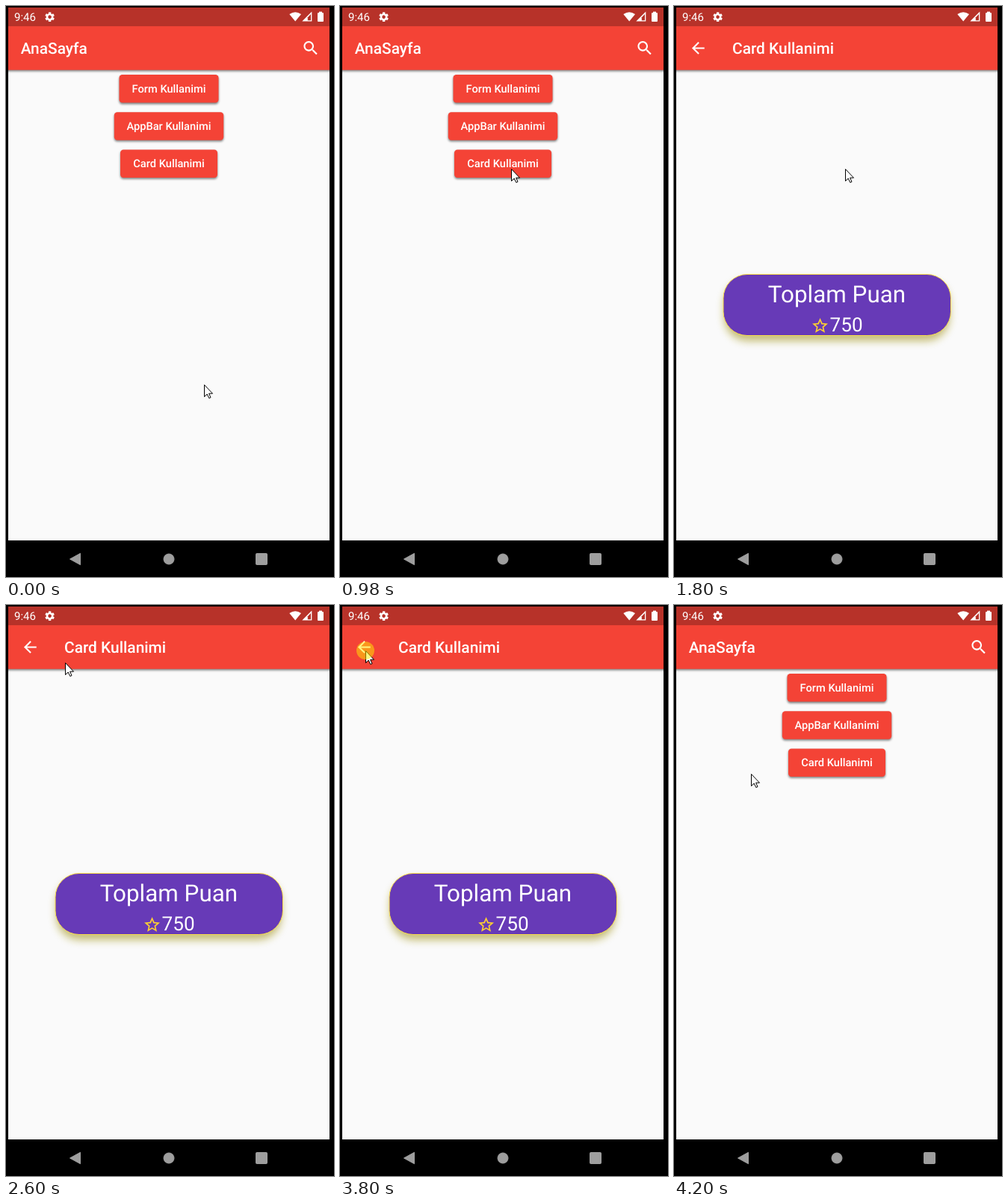
Recreate the animation shown at these times as an HTML page. Size 439 by 765 pixels, loop 4400 ms.

```html
<!DOCTYPE html>
<html lang="tr">
<head>
<meta charset="utf-8">
<title>Card Kullanimi</title>
<style>
  html, body { margin: 0; width: 100%; height: 100%; overflow: hidden; background: #000; }
  svg { display: block; width: 439px; height: 765px; }
  text { font-family: Roboto, sans-serif; fill: #fff; text-rendering: geometricPrecision; }
  .title { font-size: 20.9px; font-weight: 500; }
  .label { font-size: 14.65px; font-weight: 500; text-anchor: middle; }
</style>
</head>
<body>
<svg viewBox="0 0 439 765">
  <defs>
    <clipPath id="screen"><rect x="3" y="2" width="430" height="714"/></clipPath>
    <filter id="soft" x="-10%" y="-30%" width="120%" height="170%"><feGaussianBlur stdDeviation="1.6"/></filter>
    <filter id="wide" x="-20%" y="-50%" width="140%" height="200%"><feGaussianBlur stdDeviation="5.5"/></filter>
    <g id="page">
      <rect x="3" y="2" width="430" height="714" fill="#fafafa"/>
      <rect x="-5" y="60" width="446" height="27.4" fill="#000" opacity=".5" filter="url(#soft)"/>
      <rect x="3" y="2" width="430" height="83.7" fill="#f44336"/>
    </g>
  </defs>
  <rect width="439" height="765"/>

  <g clip-path="url(#screen)">
    <g id="home">
      <use href="#page"/>
      <text class="title" x="19.7" y="64">AnaSayfa</text>
      <path transform="translate(395.3 43.9) scale(1.046)" fill="#fff" d="M15.5 14h-.79l-.28-.27C15.41 12.59 16 11.11 16 9.5 16 5.91 13.09 3 9.5 3S3 5.91 3 9.5 5.91 16 9.5 16c1.61 0 3.09-.59 4.23-1.57l.27.28v.79l5 4.99L20.49 19l-4.99-5zm-6 0C7.01 14 5 11.99 5 9.5S7.01 5 9.5 5 14 7.01 14 9.5 11.99 14 9.5 14z"/>
      <g id="buttons"></g>
    </g>
    <rect id="dim" x="3" y="2" width="430" height="714" opacity=".6"/>
    <g id="card">
      <use href="#page"/>
      <path transform="translate(19.8 43.9) scale(1.046)" fill="#fff" d="M20 11H7.83l5.59-5.59L12 4l-8 8 8 8 1.41-1.41L7.83 13H20z"/>
      <text class="title" x="78" y="64">Card Kullanimi</text>
      <rect x="67" y="367" width="302" height="82" rx="32" fill="#a2941c" opacity=".6" filter="url(#wide)"/>
      <rect x="66" y="359.5" width="304.5" height="82" rx="32" fill="#673ab7" stroke="#fbe04a"/>
      <text x="218" y="397" font-size="31.4" text-anchor="middle">Toplam Puan</text>
      <path transform="translate(183 415.8) scale(1.046)" fill="#fdcf32" d="M22 9.24l-7.19-.62L12 2 9.19 8.63 2 9.24l5.46 4.73L5.82 21 12 17.27 18.18 21l-1.63-7.03zM12 15.4l-3.76 2.27 1-4.28-3.32-2.88 4.38-.38L12 6.1l1.71 4.04 4.38.38-3.32 2.88 1 4.28z"/>
      <text x="208.5" y="436.3" font-size="26.15">750</text>
    </g>
    <rect x="3" y="2" width="430" height="25.1" opacity=".25"/>
  </g>

  <!-- status bar -->
  <text x="11" y="20" font-size="15">9:46</text>
  <g transform="translate(58.6 14.7) rotate(30)" fill="none" stroke="#fff">
    <circle r="3.6" stroke-width="2.6"/>
    <circle r="5.4" stroke-width="2" pathLength="6" stroke-dasharray=".56 .44" stroke-dashoffset=".28"/>
  </g>
  <g fill="#fff">
    <path d="M379.3 11Q387.2 5.4 395 11L387.2 20.5Z"/>
    <path d="M396.3 20.5L409.3 7.5V20.5Z"/>
    <path d="M403.8 15.2L408 11V19.2H403.8Z" fill="#b73228"/>
    <rect x="417" y="9" width="8" height="12" rx="1"/>
    <rect x="419" y="7.6" width="4" height="2"/>
  </g>

  <!-- navigation bar -->
  <g fill="#9e9e9e" stroke="#9e9e9e" stroke-linejoin="round">
    <path d="M85.5 741L99.5 733.3V748.7Z"/>
    <circle cx="218" cy="741" r="7"/>
    <rect x="334.5" y="733.5" width="15" height="15" rx="1"/>
  </g>

  <path id="cursor" d="M.5 .6V16.5L4.2 13 6.8 18.5 9 17.5 6.6 12.2H11.5Z" fill="#fff" stroke="#000"/>
  <circle id="tap" cx="34" cy="61" r="12" fill="#ffeb00" opacity=".5"/>
</svg>
<script>
const LOOP = 4400;
const $ = id => document.getElementById(id);
const home = $('home'), dim = $('dim'), card = $('card'), cursor = $('cursor'), tap = $('tap');

// Pointer stops: time, x, y
const stops = [
  [0, 265, 507], [200, 255, 437], [380, 232, 249], [580, 229, 231],
  [780, 229, 219], [980, 229, 218], [2200, 184, 166], [2400, 100, 82],
  [2600, 79, 77], [3000, 68, 75], [3200, 52, 69], [3400, 45, 65],
  [3600, 34, 61], [4000, 48, 106], [4200, 103, 226]
];

const button = (label, width, i) => {
  const x = 218 - width / 2, y = 92 + i * 50.2;
  const box = (dy, more) =>
    `<rect x="${x}" y="${y + dy}" width="${width}" height="37.6" rx="4.2" ${more}/>`;
  return box(1.8, 'opacity=".5" filter="url(#soft)"') + box(0, 'fill="#f44336"') +
    `<text class="label" x="218" y="${y + 24}">${label}</text>`;
};
$('buttons').innerHTML =
  button('Form Kullanimi', 133, 0) +
  button('AppBar Kullanimi', 146.4, 1) +
  button('Card Kullanimi', 130, 2);

const show = (el, on) => el.setAttribute('visibility', on ? 'visible' : 'hidden');
const zoom = (el, s) =>
  el.setAttribute('transform', `translate(218 359) scale(${s}) translate(-218 -359)`);

function draw(t) {
  const within = (a, b) => t >= a && t < b;
  const opening = within(1600, 1800), closing = within(4000, 4200);
  zoom(home, opening ? 1.05 : closing ? 1.03 : 1);
  zoom(card, opening ? 0.99 : 1);
  show(dim, opening);
  show(card, within(1600, 4000));
  show(tap, within(3800, 4000));
  const [, x, y] = stops.findLast(s => s[0] <= t);
  cursor.setAttribute('transform', `translate(${x} ${y})`);
}

const start = performance.now();
function tick() {
  draw((performance.now() - start) % LOOP);
  requestAnimationFrame(tick);
}
tick();
</script>
</body>
</html>
```
